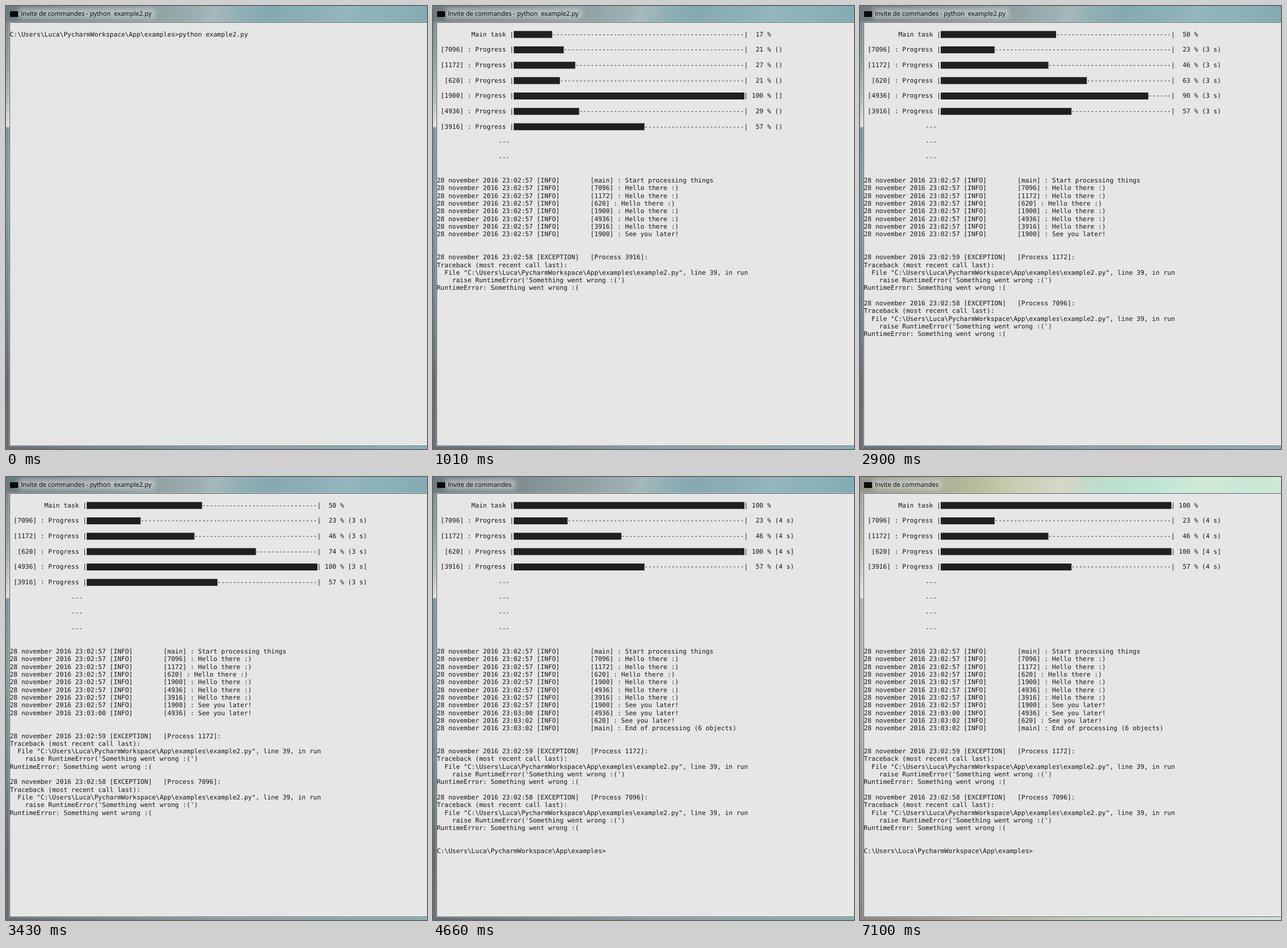
Animation, 730 px wide and 768 px high, one loop 7.2 s. Source, as an HTML page:

```html
<!DOCTYPE html>
<html lang="fr">
<head>
<meta charset="utf-8">
<title>Invite de commandes</title>
<style>
  html, body { margin: 0; width: 100%; height: 100%; overflow: hidden; }
  body { position: relative; }
  #stage {
    position: absolute; left: 0; top: 0; width: 730px; height: 768px; overflow: hidden;
    --panel: #e6e6e6;
    --top: linear-gradient(112deg, transparent 47%, #b3c5c566 49%, transparent 55%, #6f9ba544 63%, transparent 66%, #a9c6ca55 80%, transparent 86%),
      linear-gradient(90deg, #6f7c7e, #7f8d8f 20%, #93a4a5 38%, #9fb2b3 47%, #8fb0b5 56%, #86abb3 72%, #8db3bb 88%, #84aab3);
    --left: linear-gradient(#7c898b, #93a1a2 100px, #b5c0c0 165px, #dde3e2 209px, #7f969d 211px, #879ea4 330px, #74868d 520px, #666b74 650px, #6b6f74);
    --bottom: linear-gradient(90deg, #666b70, #7b888c 30%, #8ca1a5 55%, #84a6ae 75%, #87adb6);
    background: #87999c;
  }
  #stage.start { --panel: #e4e6e5; }
  #stage.faded {
    --top: linear-gradient(112deg, transparent 44%, #e3d8cc77 48%, transparent 53%, #b4e4d466 62%, transparent 72%, #e2ecd866 82%, transparent 90%),
      linear-gradient(90deg, #92938a, #a5a892 15%, #b6bc9a 27%, #cbd0b2 38%, #cfd6c4 47%, #bfdccb 56%, #c2e8d9 75%, #cde8d6);
    --left: linear-gradient(#a2a197, #b9b8aa 120px, #e6e6df 209px, #b2b5a9 211px, #b7b8ac 380px, #9b9189 600px, #8d837f);
    --bottom: linear-gradient(90deg, #8d837f, #b3ada2 30%, #c3cdb8 55%, #c5d9c8 75%, #cbe5da);
  }
  .edge { position: absolute; }
  .left { left: 0; top: 0; width: 6px; height: 768px; background: var(--left); }
  .top { left: 0; top: 0; width: 730px; height: 28px; background: var(--top); }
  .bottom { left: 6px; top: 763px; width: 724px; height: 5px; background: var(--bottom); }
  .panel {
    position: absolute; left: 6px; top: 28px; width: 730px; height: 733px;
    border: 1px solid #4f5a5c; background: var(--panel);
    box-shadow: 0 0 0 1px #ffffff66;
  }
  .caption { position: absolute; left: 0; top: 0; isolation: isolate; }
  .icon { position: absolute; left: 7px; top: 9px; width: 14px; height: 10px; background: #0b0b0b; }
  #title {
    position: absolute; left: 26px; top: 6px; white-space: pre; color: #000;
    font: 11px/16px "Open Sans", "Noto Sans", sans-serif;
    text-rendering: geometricPrecision;
  }
  #title::before {
    content: ""; position: absolute; z-index: -1; inset: -2px -7px 0 -5px;
    background: #d6dddc99; border-radius: 6px; filter: blur(4px);
  }
  #text {
    position: absolute; left: 6.667px; top: 42.667px; margin: 0; white-space: pre; color: #161616;
    font: 11.07px/13.3333px "DejaVu Sans Mono", "Noto Sans Mono", monospace;
    text-rendering: geometricPrecision; font-variant-ligatures: none;
  }
  svg { position: absolute; left: 0; top: 0; fill: #202020; }
</style>
</head>
<body>
<div id="stage">
  <div class="edge left"></div>
  <div class="edge top"></div>
  <div class="edge bottom"></div>
  <div class="panel"></div>
  <div class="caption"><div class="icon"></div><div id="title"></div></div>
  <pre id="text"></pre>
  <svg width="730" height="768"><g id="bars"></g><rect id="caret" width="6.667" height="4"/></svg>
</div>
<script>
const LOOP = 7200, CELLS = 60, SLOTS = 9;
const COL = 20 / 3, LINE = 40 / 3, LEFT = 20 / 3, TOP = 128 / 3;
const PROMPT = 'C:\\Users\\Luca\\PycharmWorkspace\\App\\examples>';
const SCRIPT = PROMPT.slice(0, -1) + '\\example2.py';
const $ = id => document.getElementById(id);

const stamp = (time, level) => `28 november 2016 23:${time} [${level}]`.padEnd(40);
const info = (time, who, msg) => `${stamp(time, 'INFO')}[${who}] : ${msg}`;
const log = [
  info('02:57', 'main', 'Start processing things'),
  ...[7096, 1172, 620, 1900, 4936, 3916].map(id => info('02:57', id, 'Hello there :)')),
  info('02:57', 1900, 'See you later!'),
  info('03:00', 4936, 'See you later!'),
  info('03:02', 620, 'See you later!'),
  info('03:02', 'main', 'End of processing (6 objects)')
];

const failure = (time, id) => [
  `${stamp(time, 'EXCEPTION')}[Process ${id}]:`,
  'Traceback (most recent call last):',
  `  File "${SCRIPT}", line 39, in run`,
  "    raise RuntimeError('Something went wrong :(')",
  'RuntimeError: Something went wrong :(',
  ''
];
const fail3916 = failure('02:58', 3916);
const fail7096 = failure('02:58', 7096);
const fail1172 = failure('02:59', 1172);
const early = [...fail7096, ...fail3916];
const late = [...fail1172, ...fail7096];

// Each step: start time, main percent, elapsed label, [process, percent] rows, log length, failures
const steps = [
  [470, 17, '', [[7096, 10], [1172, 13], [620, 10.4], [1900, 50], [4936, 14], [3916, 28]], 7, []],
  [1010, 17, '', [[7096, 21], [1172, 27], [620, 20.6], [1900, 100], [4936, 29], [3916, 57]], 8, fail3916],
  [1430, 33, '1 s', [[7096, 23], [1172, 37], [620, 31], [1900, 100, ''], [4936, 45], [3916, 57]], 8, early],
  [1940, 50, '2 s', [[7096, 23], [1172, 46], [620, 42], [4936, 60], [3916, 57]], 8, late],
  [2500, 50, '2 s', [[7096, 23], [1172, 46], [620, 52], [4936, 75], [3916, 57]], 8, late],
  [2900, 50, '3 s', [[7096, 23], [1172, 46], [620, 63], [4936, 90], [3916, 57]], 8, late],
  [3430, 50, '3 s', [[7096, 23], [1172, 46], [620, 74], [4936, 100], [3916, 57]], 9, late],
  [3890, 50, '4 s', [[7096, 23], [1172, 46], [620, 85], [4936, 100, '3 s'], [3916, 57]], 9, late],
  [4390, 50, '4 s', [[7096, 23], [1172, 46], [620, 95], [3916, 57]], 9, late],
  [4660, 100, '4 s', [[7096, 23], [1172, 46], [620, 100], [3916, 57]], 11, late]
];

const filled = pct => Math.round(pct * CELLS / 100);

function row(label, pct, suffix) {
  const n = filled(pct);
  const cells = ' '.repeat(n) + '-'.repeat(CELLS - n);
  return `${label.padStart(18)} |${cells}| ${String(Math.round(pct)).padStart(3)} % ${suffix}`;
}

function processRow([id, pct, own], elapsed) {
  const time = own ?? elapsed;
  return row(`[${id}] : Progress`, pct, pct === 100 ? `[${time}]` : `(${time})`);
}

function bar(pct, i) {
  const rect = document.createElementNS('http://www.w3.org/2000/svg', 'rect');
  const box = { x: LEFT + 20 * COL, y: TOP + 2 / 3 + 2 * i * LINE, width: filled(pct) * COL, height: 12 };
  for (const key in box) rect.setAttribute(key, box[key].toFixed(3));
  return rect;
}

function drawText(index) {
  if (index < 0) {
    $('text').textContent = PROMPT + 'python example2.py';
    $('bars').replaceChildren();
    return;
  }
  const [, main, elapsed, rows, logged, failures] = steps[index];
  const top = [row('Main task', main, ''), ...rows.map(r => processRow(r, elapsed))];
  while (top.length < SLOTS) top.push('---'.padStart(19));
  const lines = [...top.flatMap(line => [line, '']), '', ...log.slice(0, logged), '', '', ...failures];
  if (index === steps.length - 1) lines.push('', PROMPT);
  $('text').textContent = lines.join('\n');
  $('bars').replaceChildren(...[main, ...rows.map(r => r[1])].map(bar));
}

function drawCaret(t) {
  const typing = t >= 150 && t < 470;
  const waiting = (t >= 5310 && t < 5880) || (t >= 6420 && t < 6950);
  const [col, line] = typing ? [0, 1] : [PROMPT.length, 45];
  const caret = $('caret');
  caret.style.display = typing || waiting ? 'inline' : 'none';
  caret.setAttribute('x', LEFT + col * COL);
  caret.setAttribute('y', TOP + (line + 1) * LINE - 4);
}

let shown;
function frame(now) {
  const t = now % LOOP;
  const index = steps.filter(s => s[0] <= t).length - 1;
  if (index !== shown) {
    shown = index;
    drawText(index);
    $('title').textContent = 'Invite de commandes' + (t < 4660 ? ' - python  example2.py' : '');
  }
  $('stage').className = t < 470 ? 'start' : t >= 7100 ? 'faded' : '';
  drawCaret(t);
}

const begin = performance.now();
function tick() {
  frame(performance.now() - begin);
  requestAnimationFrame(tick);
}
tick();
</script>
</body>
</html>
```
